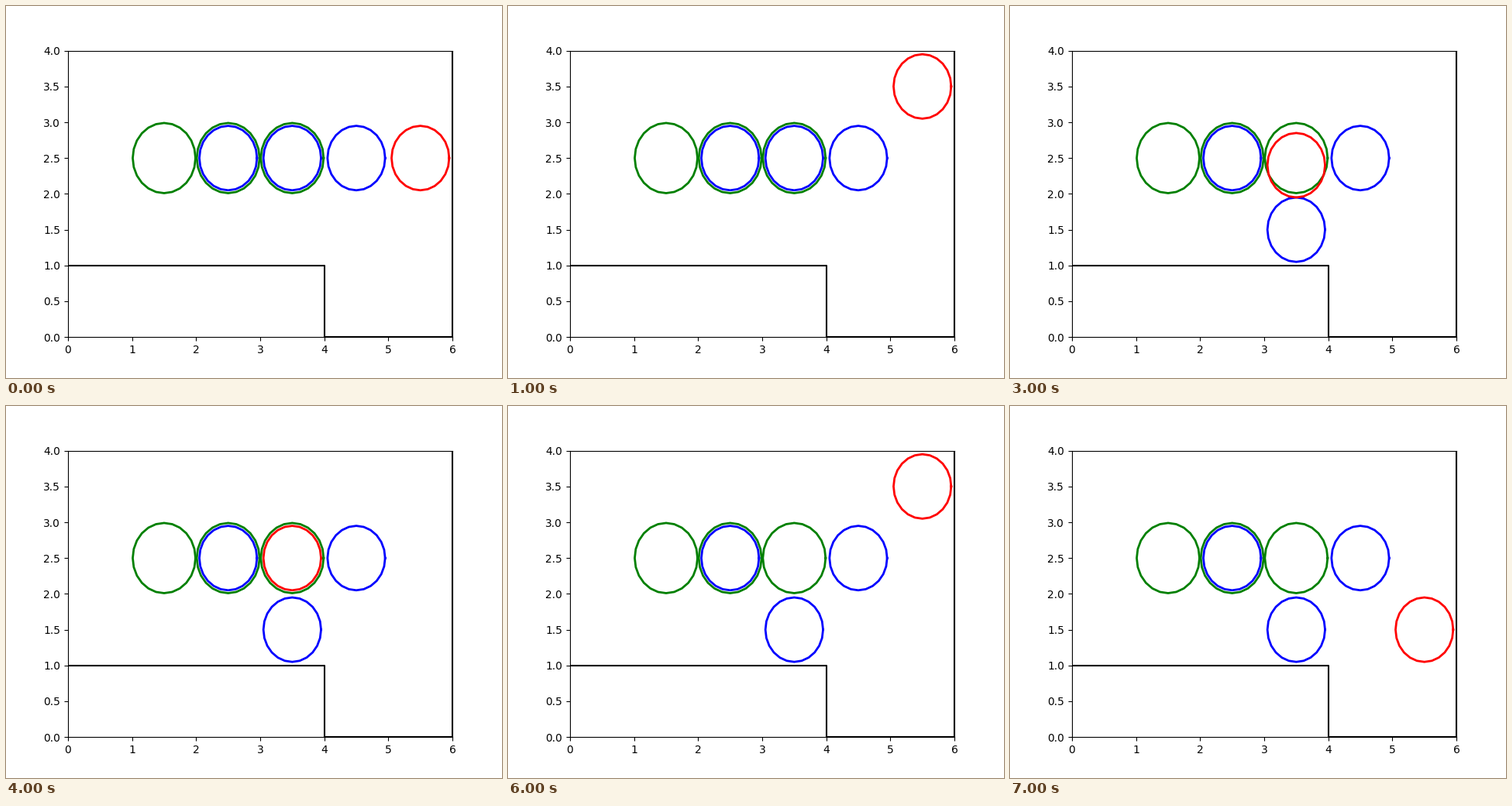
These frames come from a looping animation (640x480 px, 8000 ms). A matplotlib script:

```python
import matplotlib.pyplot as plt
import numpy as np
from matplotlib.animation import FuncAnimation

RADIUS = 0.45
GOAL_RADIUS = 0.49
ROW = 2.5
PUSHED_X = 3.5
STOPS = [(5.5, 2.5), (5.5, 3.5), (3.5, 3.4), (3.5, 2.4),
         (3.5, 2.5), (3.5, 3.5), (5.5, 3.5), (5.5, 1.5)]

angle = np.linspace(0, 2 * np.pi, 25)

fig, ax = plt.subplots(figsize=(6.4, 4.8), dpi=100)
ax.set_xlim(0, 6)
ax.set_ylim(0, 4)
ax.plot([0, 4, 4, 6, 6], [1, 1, 0, 0, 4], color="black", lw=1.5)


def outline(x, y, radius):
    return x + radius * np.cos(angle), y + radius * np.sin(angle)


def ring(x, y, radius, color):
    return ax.plot(*outline(x, y, radius), color=color, lw=2)[0]


def pushed_y(step):
    """The blue disc stays at the lowest place the red one pushed it to."""
    contacts = [y - 2 * RADIUS for x, y in STOPS[:step + 1] if x == PUSHED_X]
    return min([ROW] + contacts)


for x in (1.5, 2.5, 3.5):
    ring(x, ROW, GOAL_RADIUS, "green")
for x in (2.5, 4.5):
    ring(x, ROW, RADIUS, "blue")
pushed = ring(PUSHED_X, ROW, RADIUS, "blue")
red = ring(*STOPS[0], RADIUS, "red")


def update(step):
    red.set_data(*outline(*STOPS[step], RADIUS))
    pushed.set_data(*outline(PUSHED_X, pushed_y(step), RADIUS))
    return red, pushed


anim = FuncAnimation(fig, update, frames=len(STOPS), interval=1000,
                     repeat=True, repeat_delay=0)
plt.show()
```
